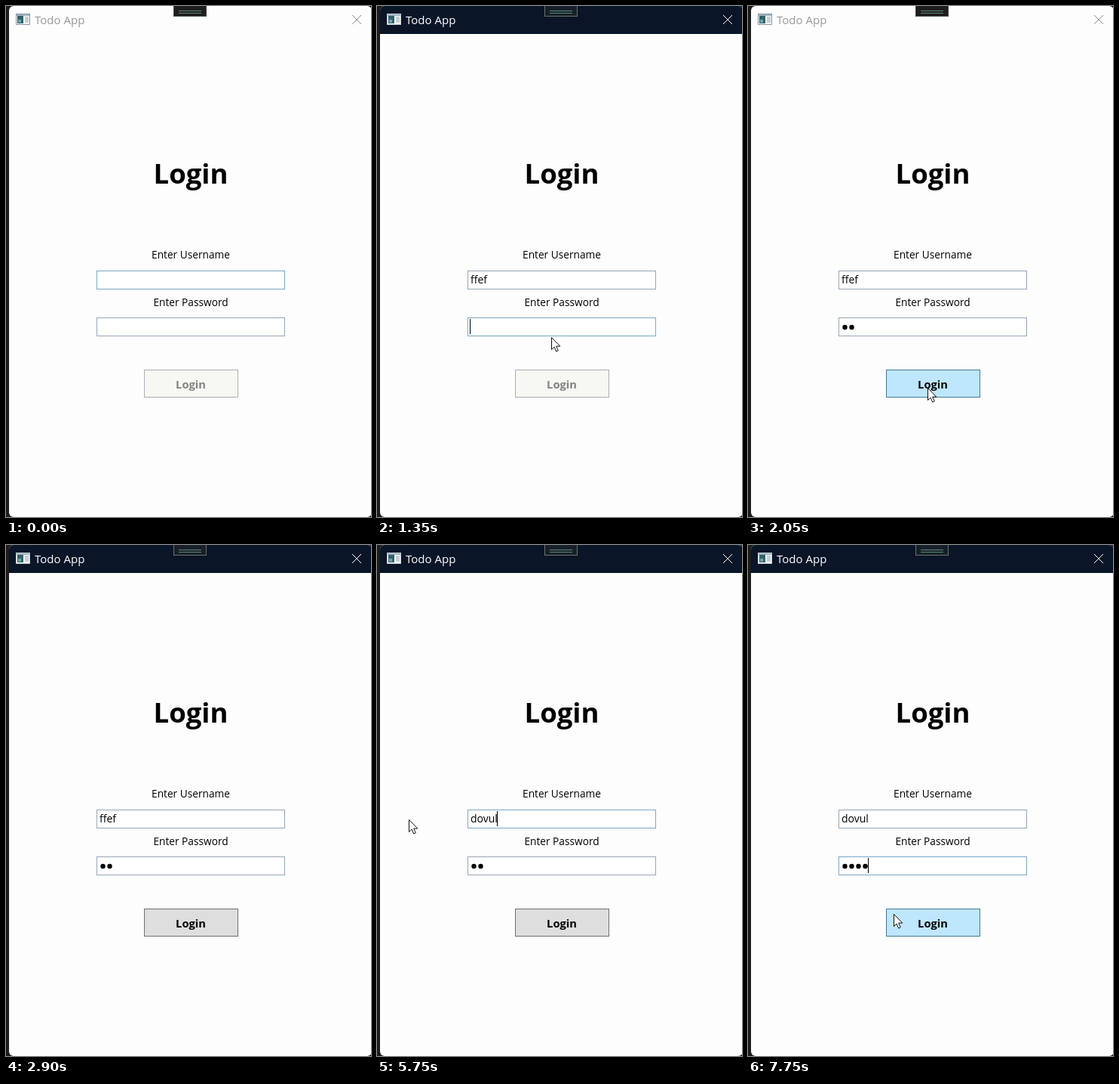
Write an HTML page with a canvas that moves like this. It is 484x676 px and loops after 8000 ms.

```html
<!DOCTYPE html>
<html lang="en">
<head>
<meta charset="utf-8">
<title>Todo App</title>
<style>
html, body { margin: 0; width: 100%; height: 100%; overflow: hidden; background: #1c1c1c; }
canvas { display: block; }
</style>
</head>
<body>
<canvas id="stage" width="484" height="676"></canvas>
<script>
const ctx = document.getElementById('stage').getContext('2d');
const LOOP = 8000, STEP = 50;
const FONT = '"Open Sans", "Noto Sans", sans-serif';
const NAME = 'dovul';
const FIELD_X = 120, TEXT_X = 124, CENTER = 245;

// The pointer shows from `show` to `hide` and glides during `move`.
const sweeps = [
  { show: 50, hide: 100, move: [50, 100], from: [210, 354], to: [210, 354] },
  { show: 1050, hide: 1400, move: [1050, 1250], from: [236, 378], to: [231, 438] },
  { show: 1700, hide: 2250, move: [1700, 1950], from: [231, 438], to: [238, 505] },
  { show: 2250, hide: 2400, move: [2250, 2400], from: [228, 495], to: [377, 460] },
  { show: 3050, hide: 3200, move: [3050, 3200], from: [414, 404], to: [350, 365] },
  { show: 5750, hide: 6050, move: [5750, 6050], from: [42, 363], to: [214, 400] },
  { show: 6600, hide: LOOP, move: [7200, 7750], from: [16, 421], to: [193, 488] }
];

const between = (t, start, end) => t >= start && t < end;
const progress = (t, start, end) => Math.min(1, Math.max(0, (t - start) / (end - start)));
const ease = k => k * k * (3 - 2 * k);
const keysPressed = (t, start, gap, max) =>
  Math.min(max, Math.max(0, Math.floor((t - start) / gap) + 1));
const typed = (str, t, start, gap) => str.slice(0, keysPressed(t, start, gap, str.length));

function userText(t) {
  if (t < 4150) return typed('ffef', t, 450, 120);
  if (t < 4750) return 'vb'.slice(0, 2 - keysPressed(t, 4650, 50, 2));
  return typed(NAME, t, 4750, 150);
}

function dotCount(t) {
  return t < 6850 ? keysPressed(t, 1450, 150, 2) : keysPressed(t, 6850, 150, 4);
}

function focusedField(t) {
  if (between(t, 1950, 3250)) return '';
  return t < 1200 || between(t, 3250, 6100) ? 'user' : 'pass';
}

function pointerAt(t) {
  const sweep = sweeps.find(s => between(t, s.show, s.hide));
  if (!sweep) return null;
  const k = ease(progress(t, ...sweep.move));
  return sweep.from.map((v, i) => Math.round(v + (sweep.to[i] - v) * k));
}

function rect(color, x, y, w, h) {
  ctx.fillStyle = color;
  ctx.fillRect(x, y, w, h);
}

function box(fill, border, x, y, w, h) {
  rect(border, x, y, w, h);
  rect(fill, x + 1, y + 1, w - 2, h - 2);
}

function text(str, x, y, size, { color = '#000', align = 'center', weight = 400 } = {}) {
  ctx.font = `${weight} ${size}px ${FONT}`;
  ctx.textAlign = align;
  ctx.fillStyle = color;
  ctx.fillText(str, x, y);
}

function drawIcon(on) {
  box('#f4f6f6', on ? '#c4ccd0' : '#8b979f', 13, 10, 19, 15);
  rect('#9fb4bf', 14, 11, 17, 2);
  rect('#33616c', 15, 13, 8, 10);
  rect('#73a3a4', 16, 18, 4, 4);
  rect('#c5d0d5', 25, 14, 5, 8);
}

function drawClose(color) {
  ctx.strokeStyle = color;
  ctx.lineWidth = 1;
  ctx.beginPath();
  for (const side of [-6, 6]) {
    ctx.moveTo(465 + side, 12);
    ctx.lineTo(465 - side, 24);
  }
  ctx.stroke();
}

function drawWindow(on) {
  rect('#1c1c1c', 0, 0, 484, 676);
  ctx.save();
  ctx.beginPath();
  ctx.roundRect(4, 0, 481, 676, 6);
  ctx.clip();
  rect('#fdfdfd', 4, 0, 481, 676);
  if (on) rect('#0a1528', 4, 0, 481, 37);
  ctx.restore();

  drawIcon(on);
  text('Todo App', 38, 24, 15, { color: on ? '#fff' : '#999', align: 'left' });
  drawClose(on ? '#fff' : '#8c8c8c');

  // Docked toolbar handle
  box(on ? '#17202a' : '#1e1e1e', on ? '#6c706b' : '#3c4742', 222, -1, 44, 15);
  for (const y of [6, 9]) rect('#5b8a72', 229, y, 30, 1);
}

// Draws a text field; `selecting` runs 0 to 1 from right to left, null shows the caret.
function drawField(y, { focused, end, caret, selecting, drawContent }) {
  box('#fff', focused ? '#7aa8c6' : '#98a5b5', FIELD_X, y, 250, 25);
  drawContent();
  if (selecting !== null) {
    const width = (end - TEXT_X) * selecting;
    rect('rgba(0,120,215,.4)', end - width, y + 3, width, 19);
  } else if (focused && caret) {
    rect('#000', end, y + 2, 1, 20);
  }
}

function drawDots(count) {
  ctx.fillStyle = '#000';
  for (let i = 0; i < count; i++) {
    ctx.beginPath();
    ctx.arc(TEXT_X + 4.5 + 9 * i, 425, 3.2, 0, Math.PI * 2);
    ctx.fill();
  }
}

function drawButton(enabled, hot) {
  const [fill, border, color] = !enabled ? ['#f7f8f1', '#a9aeb2', '#838383']
    : hot ? ['#bee6fd', '#437b97', '#000'] : ['#dedede', '#707070', '#000'];
  box(fill, border, 183, 481, 125, 37);
  text('Login', CENTER, 506, 14.7, { color, weight: 700 });
}

function drawPointer(x, y) {
  ctx.save();
  ctx.translate(x + .5, y + .5);
  const arrow = new Path2D('M0 0V16L3.6 12.6 6.2 18.5 8.8 17.3 6.2 11.6H11.3Z');
  ctx.fillStyle = '#fff';
  ctx.fill(arrow);
  ctx.strokeStyle = '#111';
  ctx.lineWidth = 1;
  ctx.stroke(arrow);
  ctx.restore();
}

function draw(t) {
  const on = between(t, 250, 2050) || t >= 2900;
  const focus = focusedField(t);
  const name = userText(t), count = dotCount(t);
  const caret = on && t >= 300 && !between(t, 4500, 4650);

  drawWindow(on);
  text('Login', CENTER, 235, 36.5, { weight: 700 });
  text('Enter Username', CENTER, 334, 13.7);
  text('Enter Password', CENTER, 397, 13.7);

  ctx.font = `14px ${FONT}`;
  drawField(350, {
    focused: focus === 'user',
    end: Math.floor(TEXT_X + ctx.measureText(name).width) - (name ? 0 : 1),
    caret,
    selecting: between(t, 3300, 4150) ? progress(t, 3300, 3450) : null,
    drawContent: () => text(name, TEXT_X, 367, 14, { align: 'left' })
  });
  drawField(412, {
    focused: focus === 'pass',
    end: TEXT_X + 9 * count - 1,
    caret,
    selecting: between(t, 6150, 6850) ? progress(t, 6150, 6300) : null,
    drawContent: () => drawDots(count)
  });

  drawButton(name && count, between(t, 1850, 2900) || t >= 7650);
  const pointer = pointerAt(t);
  if (pointer) drawPointer(...pointer);
}

function frame(now) {
  draw(Math.floor(now % LOOP / STEP) * STEP);
  requestAnimationFrame(frame);
}
frame(0);
</script>
</body>
</html>
```
